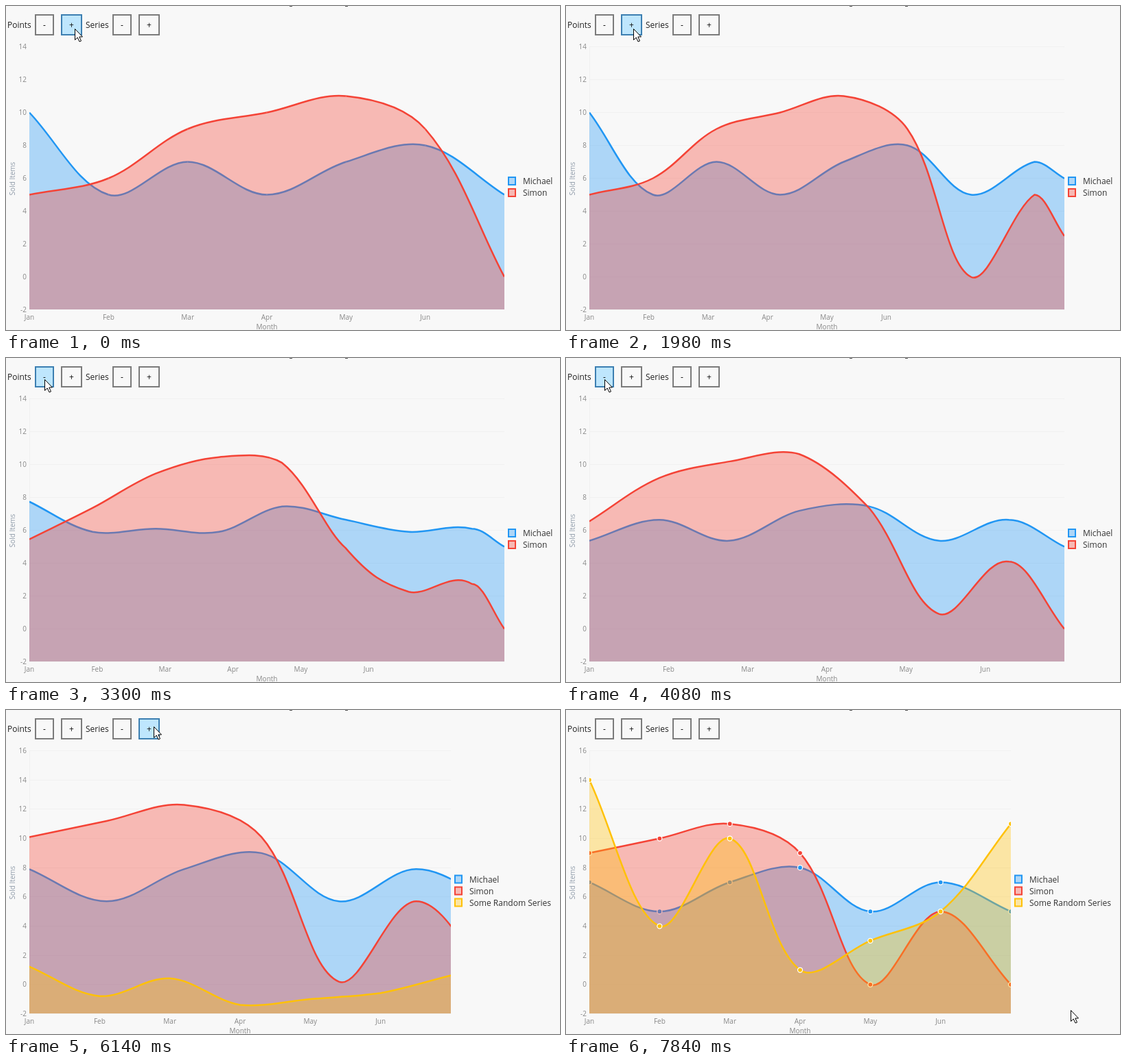
Recreate the animation shown at these times as an HTML page with a canvas. Size 807 by 473 pixels, loop 8 s.

```html
<!DOCTYPE html>
<html lang="en">
<head>
<meta charset="utf-8">
<title>Sold items</title>
<style>
  html, body { margin: 0; width: 100%; height: 100%; overflow: hidden; background: #f8f8f8; }
  canvas { display: block; }
</style>
</head>
<body>
<canvas id="stage" width="807" height="473"></canvas>
<script>
const ctx = document.getElementById('stage').getContext('2d');
const LOOP = 8000;
const LEFT = 34, TOP = 59.5, BOTTOM = 443.5, MIN = -2;
const SMOOTHNESS = 0.7;
const MARKER_DELAY = 60, MARKER_GROWTH = 420;
const MONTHS = ['Jan', 'Feb', 'Mar', 'Apr', 'May', 'Jun'];

const SERIES = [
  { name: 'Michael', rgb: '33,150,243', values: [10, 5, 7, 5, 7, 8, 5, 7, 5] },
  { name: 'Simon', rgb: '244,67,54', values: [5, 6, 9, 10, 11, 9, 0, 5, 0] },
  { name: 'Some Random Series', rgb: '255,193,7', values: [0, 0, 14, 4, 10, 1, 3, 5, 11] }
];

// Each view takes over at `start` and morphs from the previous one.
const view = (start, duration, first, end, series = 2, max = 14, right = 726) =>
  ({ start, duration, first, end, series, max, right });
const VIEWS = [
  view(-620, 500, 0, 7),
  view(628, 500, 0, 8),
  view(1790, 380, 0, 9),
  view(3075, 500, 1, 9),
  view(3990, 500, 2, 9),
  view(6040, 500, 2, 9, 3, 16, 648)
];

const BUTTONS = [
  { x: 42, w: 28, label: '-' },
  { x: 80, w: 31, label: '+' },
  { x: 155, w: 28, label: '-' },
  { x: 193, w: 31, label: '+' }
];
const PRESSES = [[360, 560], [1660, 1810], [2770, 2980], [3890, 3990], [5710, 5930]];

const POINTER = [
  [0, 100, 33], [1410, 100, 33], [1660, 98, 33], [2640, 98, 33],
  [2770, 56, 31], [4630, 56, 31], [5020, 168, 33], [5260, 168, 33],
  [5430, 215, 24], [7260, 215, 24], [7400, 653, 371], [7640, 653, 371],
  [7840, 735, 438], [LOOP, 735, 438]
];

const mix = (a, b, k) => a + (b - a) * k;
const clamp = v => Math.max(0, Math.min(1, v));
const distance = (a, b) => Math.hypot(a[0] - b[0], a[1] - b[1]);
const midpoint = (a, b) => [(a[0] + b[0]) / 2, (a[1] + b[1]) / 2];

function text(str, x, y, size, color, align = 'left') {
  ctx.font = `${size}px "Open Sans", "Noto Sans", sans-serif`;
  ctx.fillStyle = color;
  ctx.textAlign = align;
  ctx.fillText(str, x, y);
}

const valueY = (v, value) => mix(BOTTOM, TOP, (value - MIN) / (v.max - MIN));
const stepX = v => (v.right - LEFT) / (v.end - v.first - 1);

function pointsOf(v, series) {
  return series.values.slice(v.first, v.end)
    .map((value, i) => [LEFT + i * stepX(v), valueY(v, value)]);
}

// Flat list: the start point, then two controls and an end point per segment.
function curve(points) {
  const out = [...points[0]];
  for (let i = 0; i < points.length - 1; i++) {
    const b = points[i], c = points[i + 1];
    const a = points[i - 1] || b, d = points[i + 2] || c;
    const before = midpoint(a, b), middle = midpoint(b, c), after = midpoint(c, d);
    const length = distance(b, c);
    const k1 = distance(a, b) / (distance(a, b) + length);
    const k2 = length / (length + distance(c, d));
    for (const j of [0, 1])
      out.push(b[j] + (middle[j] - mix(before[j], middle[j], k1)) * SMOOTHNESS);
    for (const j of [0, 1])
      out.push(c[j] + (middle[j] - mix(middle[j], after[j], k2)) * SMOOTHNESS);
    out.push(...c);
  }
  return out;
}

function pad(list, length) {
  const end = list.slice(-2);
  while (list.length < length) list.push(...end);
  return list;
}

function morph(index, s, k) {
  const v = VIEWS[index], old = VIEWS[index - 1];
  const target = pointsOf(v, SERIES[s]);
  const to = curve(target);
  if (k >= 1 || !old) return to;
  const from = curve(s < old.series ? pointsOf(old, SERIES[s]) : target.map(p => [p[0], BOTTOM]));
  const length = Math.max(from.length, to.length);
  pad(from, length);
  pad(to, length);
  return to.map((end, i) => mix(from[i], end, k));
}

function trace(c) {
  ctx.moveTo(c[0], c[1]);
  for (let i = 2; i < c.length; i += 6)
    ctx.bezierCurveTo(c[i], c[i + 1], c[i + 2], c[i + 3], c[i + 4], c[i + 5]);
}

function drawCurve(c, rgb) {
  ctx.beginPath();
  trace(c);
  ctx.lineTo(c[c.length - 2], BOTTOM);
  ctx.lineTo(c[0], BOTTOM);
  ctx.fillStyle = `rgba(${rgb},.35)`;
  ctx.fill();
  ctx.beginPath();
  trace(c);
  ctx.strokeStyle = `rgb(${rgb})`;
  ctx.lineWidth = 2.5;
  ctx.stroke();
}

function drawMarker([x, y], rgb, scale) {
  ctx.beginPath();
  ctx.arc(x, y, 3.5 * scale, 0, 2 * Math.PI);
  ctx.fillStyle = `rgb(${rgb})`;
  ctx.fill();
  ctx.strokeStyle = '#fff';
  ctx.lineWidth = 1.25 * scale;
  ctx.stroke();
}

function drawAxes(v, gridVisible) {
  ctx.fillStyle = '#f1f1f1';
  if (gridVisible) ctx.fillRect(LEFT, 59, 1, 384);
  for (let value = MIN; value <= v.max; value += 2) {
    const y = Math.floor(valueY(v, value));
    ctx.fillStyle = '#f1f1f1';
    if (gridVisible) ctx.fillRect(LEFT, y, v.right - LEFT, 1);
    text(value, 30, y + 4, 10, '#888', 'right');
  }
  MONTHS.forEach((month, i) => text(month, LEFT + i * stepX(v), 458, 10, '#888', 'center'));
  text('Month', (LEFT + v.right) / 2, 472, 10, '#888', 'center');
  ctx.save();
  ctx.translate(13, 252);
  ctx.rotate(-Math.PI / 2);
  text('Sold Items', 0, 0, 10, '#8e9aa8', 'center');
  ctx.restore();
}

function drawLegend(v) {
  const x = v.right + 5;
  SERIES.slice(0, v.series).forEach((s, i) => {
    const y = 264 + (i - (v.series - 1) / 2) * 17;
    ctx.fillStyle = `rgba(${s.rgb},.35)`;
    ctx.strokeStyle = `rgb(${s.rgb})`;
    ctx.lineWidth = 2;
    ctx.fillRect(x + 1, y - 5.5, 10, 11);
    ctx.strokeRect(x + 1, y - 5.5, 10, 11);
    text(s.name, x + 22, y + 4.5, 12, '#333');
  });
}

function drawChart(t) {
  const index = VIEWS.findLastIndex(v => t >= v.start);
  const v = VIEWS[index];
  const progress = clamp((t - v.start) / v.duration);
  const scale = clamp((t - v.start - v.duration - MARKER_DELAY) / MARKER_GROWTH);

  drawAxes(v, t >= 560);
  ctx.save();
  ctx.beginPath();
  ctx.rect(LEFT, 50, v.right - LEFT, BOTTOM - 50.5);
  ctx.clip();
  SERIES.slice(0, v.series).forEach((s, i) => {
    drawCurve(morph(index, i, progress), s.rgb);
    if (scale > 0) pointsOf(v, s).forEach(p => drawMarker(p, s.rgb, scale));
  });
  // April points touched by the pointer stay in front.
  if (t >= 7300)
    SERIES.slice(0, 2).forEach(s => drawMarker(pointsOf(v, s)[3], s.rgb, 1));
  ctx.restore();
  drawLegend(v);
}

function pointerAt(t) {
  const i = POINTER.findIndex(p => p[0] > t);
  const a = POINTER[i - 1], b = POINTER[i];
  const k = (t - a[0]) / (b[0] - a[0]);
  return [mix(a[1], b[1], k), mix(a[2], b[2], k)];
}

function drawToolbar(t, [px, py]) {
  text('Points', 2, 32, 12, '#222');
  text('Series', 116, 32, 12, '#222');
  const pressed = PRESSES.some(([from, to]) => t >= from && t < to);
  for (const { x, w, label } of BUTTONS) {
    const hover = px >= x && px < x + w && py >= 12 && py < 43;
    ctx.fillStyle = !hover ? '#f8f8f8' : pressed ? '#c4e5f6' : '#bee6fd';
    ctx.strokeStyle = !hover ? '#7b7b7b' : pressed ? '#2c628b' : '#3c7fb1';
    ctx.lineWidth = 2;
    ctx.fillRect(x + 1, 13, w - 2, 29);
    ctx.strokeRect(x + 1, 13, w - 2, 29);
    text(label, x + w / 2, 32, 12, '#111', 'center');
  }
  // Descenders of the heading cut off by the top edge.
  ctx.fillStyle = '#555';
  ctx.fillRect(413, 0, 4, 1);
  ctx.fillRect(494, 0, 4, 1);
}

function drawPointer([x, y]) {
  ctx.save();
  ctx.translate(Math.round(x) + 0.5, Math.round(y) + 0.5);
  ctx.beginPath();
  [[0, 0], [0, 16], [3.7, 12.5], [6.5, 18.5], [9, 17.5], [6.3, 11.5], [11, 11.5]]
    .forEach(p => ctx.lineTo(...p));
  ctx.closePath();
  ctx.fillStyle = '#fff';
  ctx.fill();
  ctx.strokeStyle = '#000';
  ctx.lineWidth = 1;
  ctx.stroke();
  ctx.restore();
}

function draw(t) {
  ctx.fillStyle = '#f8f8f8';
  ctx.fillRect(0, 0, 807, 473);
  const pointer = pointerAt(t);
  drawChart(t);
  drawToolbar(t, pointer);
  drawPointer(pointer);
}

const began = performance.now();
function tick() {
  draw((performance.now() - began) % LOOP);
  requestAnimationFrame(tick);
}
tick();
</script>
</body>
</html>
```
